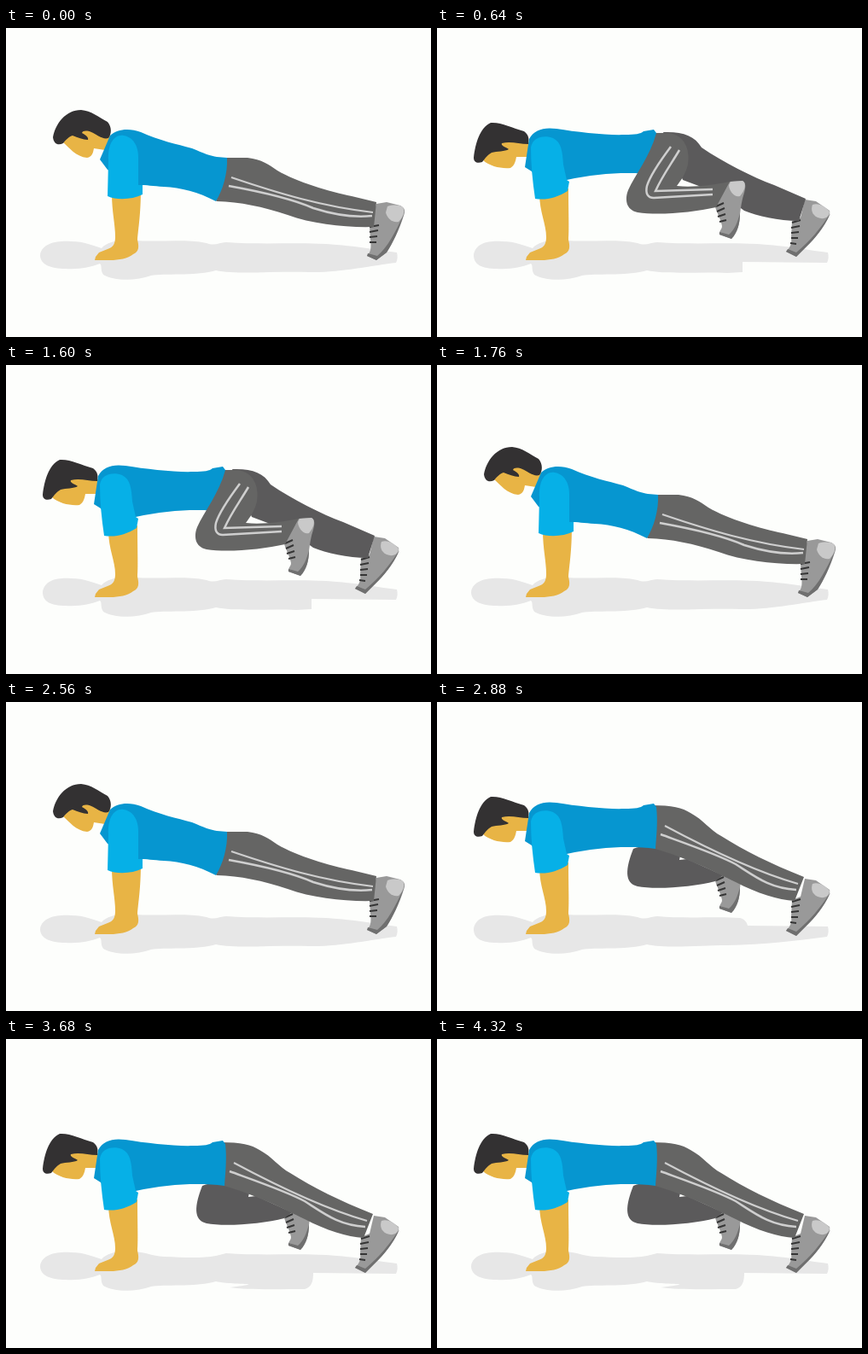
An HTML page with a canvas for the animation above (4.48 s loop, 498x362 px).

```html
<!DOCTYPE html>
<html lang="en">
<head>
<meta charset="utf-8">
<style>
  html, body { margin: 0; width: 100%; height: 100%; overflow: hidden; background: #fdfefc; }
  canvas { display: block; }
</style>
</head>
<body>
<canvas id="stage" width="498" height="362"></canvas>
<script>
const ctx = document.getElementById('stage').getContext('2d');
const STEP = 160, STEPS = 28;
const color = {
  shadow: '#e7e7e7', skin: '#e8b445', hair: '#333132', shirt: '#0696d0', sleeve: '#06b0e7',
  pants: '#656564', farPants: '#5b5a5b', shoe: '#999999', sole: '#6f6f6f', heel: '#c9c9c9',
  stripe: '#cfcfcf', lace: '#353535'
};

function fill(d, c) {
  ctx.fillStyle = c;
  ctx.fill(new Path2D(d));
}
function line(d, c, width) {
  ctx.strokeStyle = c;
  ctx.lineWidth = width;
  ctx.stroke(new Path2D(d));
}

function shadow({ left, top, tail }) {
  fill(`M${left} 266C${left + 2} 252 60 249 76 250C92 250 102 255 112 258C118 250 135 247 150 249
    ${top}C459 267 459 271 457 275${tail}C310 285 270 289 246 284C220 291 185 287 170 290
    C152 297 125 296 114 289C110 283 113 278 110 276C100 280 85 283 70 282
    C52 282 ${left} 277 ${left} 266Z`, color.shadow);
}
const waist = 'C180 251 210 247 235 252C245 256 250 251 258 251';
const slope = 'C300 254 340 251 375 253C410 255 440 261 458 263';
const shadows = {
  plank: { left: 40, top: waist + slope, tail: 'C430 278 390 287 355 286' },
  near: { left: 43, top: waist + slope, tail: 'L358 274V286L340 287' },
  farEarly: { left: 43, top: waist + 'C290 254 330 251 355 253C362 255 363 259 364 262L458 263', tail: 'C420 280 385 284 340 285' },
  farLate: { left: 40, top: 'C165 250 170 254 185 255C210 256 230 257 246 254L258 251' + slope, tail: 'L360 274C360 284 358 291 350 293C320 293 280 294 262 291' }
};

function shoe(body, sole, heel, laces) {
  fill(body, color.shoe);
  fill(sole, color.sole);
  fill(heel, color.heel);
  line(laces, color.lace, 2);
}
function plankShoe() {
  shoe('M434 206L446 204L462 208C468 211 468 215 466 220C461 236 453 252 446 263L434 272L423 267C428 262 428 256 427 248L426 232Z',
    'M466 218C460 238 453 252 446 263L434 272L423 267L424 264L435 267C447 257 456 240 466 218Z',
    'M447 209C453 207 461 207 465 210C468 215 465 222 460 227C453 229 446 222 445 216Z',
    'M426 233L437 231M426 239L436 237M426 245L435 244M426 251L434 251');
}
function backShoe(drop) {
  ctx.save();
  ctx.translate(0, drop);
  shoe('M431 201L444 203L460 214C462 220 451 237 437 252L421 268L409 262C414 257 416 252 415 246L416 226L426 222Z',
    'M461 217C456 229 446 243 437 252L421 268L409 262L411 259L421 263C437 250 449 235 461 217Z',
    'M440 207C447 204 456 210 460 215C460 222 453 225 446 222C439 219 438 212 440 207Z',
    'M416 228L426 225M415 234L425 232M415 240L424 239M415 246L423 246M414 252L421 253');
  ctx.restore();
}
function tuckShoe() {
  shoe('M343 180L358 179C362 181 362 186 360 193C357 202 356 210 355 218C355 229 352 240 345 247L331 242C330 238 334 236 334 232C333 225 327 215 325 206Z',
    'M355 217C355 229 352 240 345 247L331 242L331 239L342 242C349 236 352 228 355 217Z',
    'M344 180L358 179C363 182 361 190 355 197C348 199 342 190 342 184Z',
    'M327 209L336 205M328 215L337 211M329 221L338 218M331 227L339 225');
}

function arm(x) {
  fill(`M${x} 194L${x + 34} 188C${x + 34} 218 155 235 154 248C156 256 156 262 149 265
    C143 270 132 272 122 272H104L105 268L109 263L119 259C126 257 128 252 128 245C128 230 ${x} 215 ${x} 194Z`, color.skin);
}

function plank() {
  plankShoe();
  fill('M255 152L283 152C300 154 308 160 318 167C340 180 380 192 405 197L434 204L431 233C400 234 360 230 330 219C300 209 275 204 247 203L242 198Z', color.pants);
  line('M264 175C320 194 370 209 430 216', color.stripe, 2);
  line('M261 185C300 192 335 200 360 211C385 219 410 222 429 220', color.stripe, 2.5);
  fill('M67 134C74 140 82 151 95 152C101 151 102 146 103 141L116 143L126 127L95 118L75 124Z', color.skin);
  fill('M55 128C58 112 70 96 88 96C100 97 108 104 119 110C124 116 124 124 120 129C113 131 107 125 100 122C95 120 90 120 89 123C94 126 97 128 96 131C90 131 84 128 78 126C74 127 70 131 67 135C61 138 56 136 55 128Z', color.hair);
  arm(124);
  fill('M122 126C130 118 145 117 158 122C180 132 200 136 218 141C232 147 240 150 247 151L259 152C260 170 254 190 246 203C225 192 205 187 185 186C172 185 165 184 155 184L119 166L110 154Z', color.shirt);
  fill('M120 155C119 137 126 124 138 126C150 128 156 140 155 155V184H160L160 195C148 201 130 202 119 197Z', color.sleeve);
}

function tuckHead() {
  fill('M54 155C62 162 75 165 86 164C91 161 92 156 93 151L106 151L110 134L80 132L58 146Z', color.skin);
  fill('M43 152C45 135 50 117 63 111C75 110 88 117 102 121C108 126 108 130 107 136C96 136 86 132 76 135C74 138 82 140 84 142C80 145 70 144 64 146C60 148 56 153 53 157C47 159 43 157 43 152Z', color.hair);
}
function tuckTorso() {
  arm(120);
  fill('M108 130C114 119 125 116 140 118C165 122 200 126 220 125C232 125 239 124 242 121L254 119L257 123C259 140 257 158 256 172C225 168 190 170 152 178L120 180L111 168L103 163Z', color.shirt);
  fill('M110 140C112 128 125 125 136 129C146 134 147 145 148 160L152 178L155 180L153 191C140 199 128 202 115 200C112 180 110 160 110 140Z', color.sleeve);
}

function nearTuck() {
  backShoe(0);
  fill('M265 122C287 121 302 126 310 140C335 157 370 175 395 184L432 200L424 226C400 226 375 220 360 214C345 203 335 196 320 190L288 178Z', color.farPants);
  tuckHead();
  tuckTorso();
  tuckShoe();
  fill('M257 123L272 123C290 126 297 142 294 160C291 172 286 178 281 185C300 187 322 184 343 180L327 210C300 216 260 220 235 216C221 213 220 200 224 190C232 172 250 150 257 123Z', color.pants);
  line('M274 139C262 155 250 172 246 185C244 194 247 199 254 199L323 195', color.stripe, 2.5);
  line('M284 143C274 160 264 173 256 191L323 189', color.stripe, 2.5);
}

function farTuck() {
  tuckShoe();
  fill('M230 172C240 168 256 166 285 180L284 185L293 184L335 203L326 210C300 217 255 220 235 216C219 212 221 195 230 172Z', color.farPants);
  backShoe(6);
  tuckHead();
  fill('M252 121C275 121 288 124 297 130C312 138 320 150 333 157C360 174 390 189 430 205L419 233C400 232 375 224 350 211C325 199 295 183 252 171Z', color.pants);
  tuckTorso();
  line('M267 145C310 168 370 198 423 213', color.stripe, 2);
  line('M262 155C295 167 330 179 350 190C375 206 390 218 421 220', color.stripe, 2.5);
}

// Each pose holds from its first step until the next entry.
const poses = [
  [0, plank, shadows.plank],
  [4, nearTuck, shadows.near],
  [11, plank, shadows.plank],
  [18, farTuck, shadows.farEarly],
  [23, farTuck, shadows.farLate]
];

function draw(now) {
  const step = Math.floor(now / STEP) % STEPS;
  const [, body, shade] = poses.filter(p => p[0] <= step).pop();
  ctx.fillStyle = '#fdfefc';
  ctx.fillRect(0, 0, 498, 362);
  shadow(shade);
  body();
  requestAnimationFrame(draw);
}
requestAnimationFrame(draw);
</script>
</body>
</html>
```
